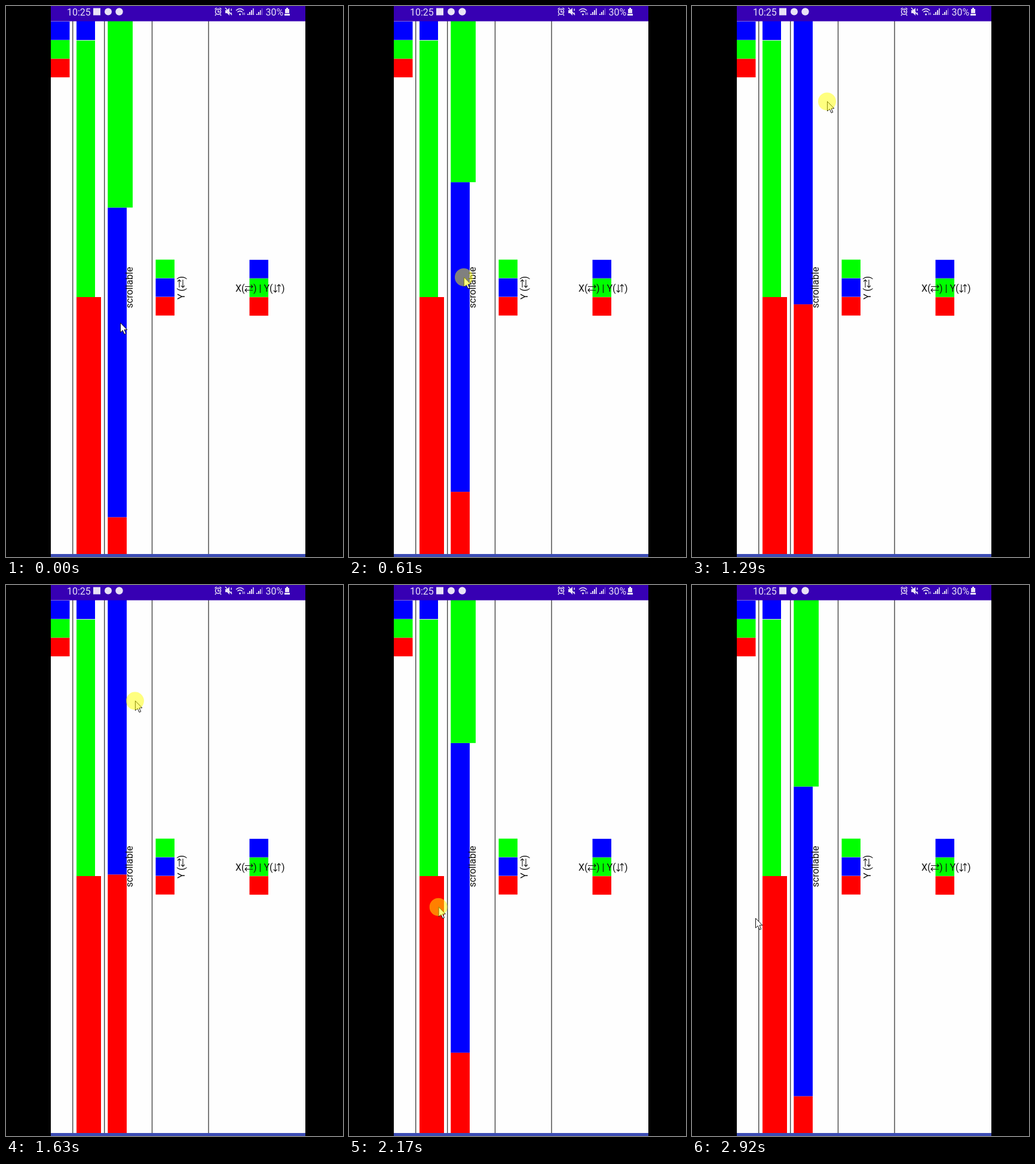
Write an HTML page that moves like this. It is 564x920 px and loops after 2.99 s.

```html
<!DOCTYPE html>
<html lang="en">
<head>
<meta charset="utf-8">
<title>Scrollable columns</title>
<style>
  html, body { margin: 0; width: 100%; height: 100%; overflow: hidden; background: #000; }
  svg { display: block; }
  text { font: 16px Roboto, "Liberation Sans", sans-serif; white-space: pre; }
  .blue { fill: #00f; }
  .green { fill: #0f0; }
  .red { fill: #f00; }
  .arrows { fill: none; stroke: #111; stroke-width: 1.1; }
</style>
</head>
<body>
<svg width="564" height="920" viewBox="0 0 564 920">
  <defs>
    <path id="pair" class="arrows" d="M0-3H13M9.8-6L13-3L9.8 0M13 3H0M3.2 0L0 3L3.2 6"/>
  </defs>
  <rect x="75" width="426" height="920" fill="#fefefe"/>
  <path d="M111.7 25V915M164.7 25V915M244.5 25V915M339 25V915" stroke="#444" stroke-width="1.4"/>
  <g id="blocks"></g>

  <g fill="#111">
    <text transform="translate(211.5 504.5) rotate(-90)">scrollable</text>
    <g transform="translate(299 490) rotate(-90)">
      <text>Y (</text>
      <use href="#pair" x="20" y="-6"/>
      <text x="33.5">)</text>
    </g>
    <text x="384" y="477">X(</text>
    <use href="#pair" x="400" y="471.5"/>
    <text x="414" y="477">) | Y(</text>
    <use href="#pair" transform="translate(453.7 465) rotate(90) scale(1 -1)"/>
    <text x="461" y="477">)</text>
  </g>

  <rect x="75" width="426" height="25.5" fill="#3700b3"/>
  <g fill="#e9e2f6">
    <text x="102" y="15.5">10:25</text>
    <rect x="146" y="3.5" width="12" height="12"/>
    <circle cx="171" cy="9.5" r="6"/>
    <circle cx="189.5" cy="9.5" r="6.2"/>
    <text x="434.5" y="15.5">30%</text>
    <path d="M467 5h2v-2h3v2h2v7h-7zM466 13h9v3h-9z"/>
    <path d="M404 15v-2h2v2zM407 15v-5h2v5zM410 15v-8h2v8zM413 15V4h1.6V15z"/>
    <path d="M419 15v-2h2v2zM422 15v-5h2v5zM425 15v-8h1.6v8z"/>
    <path d="M428.6 4V15" stroke="#e9e2f6" opacity=".5"/>
    <path d="M367 7h3l4-4v13l-4-4h-3z"/>
    <circle cx="391.5" cy="14" r="1.6"/>
  </g>
  <g fill="none" stroke="#e9e2f6" stroke-width="1.5">
    <circle cx="355" cy="9.5" r="4.5"/>
    <path d="M355 6.5V10H358M349.5 5.5L352.5 3M360.5 5.5L357.5 3M351.5 14L350 16M358.5 14L360 16"/>
    <path d="M367 3L378 15M377 4.5V8M377 11V14"/>
    <path d="M385 7.5Q391.5 1.5 398 7.5M387.3 10.2Q391.5 6.5 395.7 10.2"/>
    <path d="M396.5 11V15M399 11V15" stroke-width="1"/>
  </g>
  <rect x="75" y="915" width="426" height="5" fill="#3c4db5"/>

  <g id="pointer">
    <path d="M0 0V16L3.8 12.6L6.6 19L9.2 17.9L6.5 11.6H11.3Z" fill="#fff" stroke="#111"/>
    <circle id="touch" cx="-.5" r="15" fill="#ff0" opacity=".5"/>
  </g>
</svg>
<script>
const LOOP = 2990;
const STEP = LOOP / 44;
const LAG = 120;          // the screen trails the pointer
const REST_EDGE = 336.5;
const GRAB_Y = 529;
const BLUE_LENGTH = 517;
const BOTTOM = 915;

// time, x, y
const PATH = [
  [0, 191.5, 529], [70, 191.5, 529], [300, 191, 520], [490, 191, 487],
  [610, 192.5, 453.5], [830, 206, 365], [950, 214.5, 277.5], [1170, 223, 174],
  [1290, 226.5, 159.5], [1400, 226, 153], [1550, 221, 166], [1710, 211, 228],
  [1830, 201, 288], [2050, 169, 453], [2170, 150.5, 535.5], [2350, 148, 596],
  [2500, 153, 611], [2790, 154, 611], [2850, 132, 587], [2920, 106.5, 556.5]
];

const blocks = document.getElementById("blocks");
const pointer = document.getElementById("pointer");
const touch = document.getElementById("touch");

function block(color, x, y, width, height) {
  const rect = document.createElementNS("http://www.w3.org/2000/svg", "rect");
  rect.setAttribute("class", color);
  rect.setAttribute("x", x);
  rect.setAttribute("width", width);
  blocks.append(rect);
  span(rect, y, y + height);
  return rect;
}

function span(rect, top, bottom) {
  rect.setAttribute("y", top);
  rect.setAttribute("height", Math.max(0, bottom - top));
}

function stack(colors, x, y) {
  colors.forEach((color, i) => block(color, x, y + i * 31.2, 31.5, 30.9));
}

stack(["blue", "green", "red"], 75, 25.8);
block("blue", 118, 25, 31, 31.8);
block("green", 118, 57.7, 31, 428.5);
block("red", 118, 486, 41, BOTTOM - 486);
stack(["green", "blue", "red"], 250.5, 423.5);
stack(["blue", "green", "red"], 407.5, 423.8);
const lower = block("red", 170.3, 0, 31.7, 0);
const middle = block("blue", 170.3, 0, 31.7, 0);
const upper = block("green", 170.3, 0, 41.7, 0);

function slope(i, axis) {
  const a = PATH[Math.max(0, i - 1)];
  const b = PATH[Math.min(PATH.length - 1, i + 1)];
  return (b[axis] - a[axis]) / (b[0] - a[0]);
}

// Cubic Hermite interpolation along the pointer path
function along(time, axis) {
  const t = Math.min(PATH[PATH.length - 1][0], Math.max(0, time));
  const i = Math.max(0, PATH.findIndex(p => p[0] >= t) - 1);
  const a = PATH[i], b = PATH[i + 1];
  const length = b[0] - a[0];
  const u = (t - a[0]) / length, v = 1 - u;
  return a[axis] * v * v * (1 + 2 * u) + b[axis] * u * u * (3 - 2 * u)
    + length * u * v * (v * slope(i, axis) - u * slope(i + 1, axis));
}

function draw(time) {
  const t = Math.floor(((time + 6) % LOOP) / STEP) * STEP;
  const edge = Math.min(REST_EDGE, REST_EDGE + along(t - LAG, 2) - GRAB_Y);
  const end = edge + BLUE_LENGTH;
  span(upper, 25, edge);
  span(middle, Math.max(25, edge), end);
  span(lower, end, BOTTOM);
  pointer.setAttribute("transform", `translate(${along(t, 1)} ${along(t, 2)})`);
  touch.setAttribute("visibility", t > 130 && t < 2500 ? "visible" : "hidden");
}

const start = performance.now();
function tick() {
  draw(performance.now() - start);
  requestAnimationFrame(tick);
}
tick();
</script>
</body>
</html>
```
